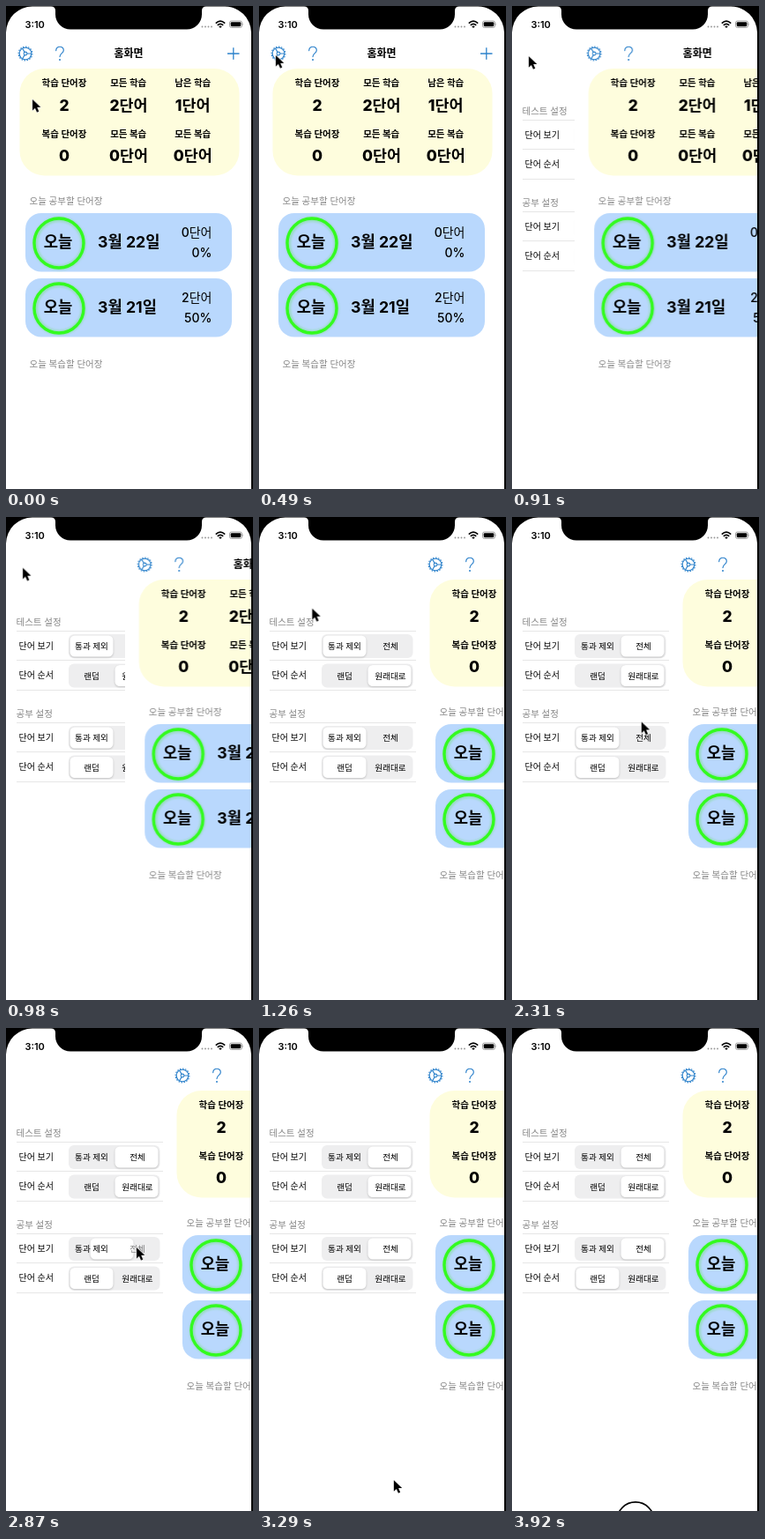
These frames come from a looping animation (280x548 px, 3.99 s). An HTML page:

```html
<!DOCTYPE html>
<html lang="ko">
<head>
<meta charset="utf-8">
<title>홈화면</title>
<style>
  html, body { margin: 0; width: 100%; height: 100%; overflow: hidden; background: #fff; }
  svg { display: block; width: 280px; height: 548px; }
  text { font-family: Inter, "Noto Sans CJK KR", "Noto Sans CJK", sans-serif; fill: #000; }
  .mid { text-anchor: middle; }
  .end { text-anchor: end; font-size: 14px; font-weight: 500; }
  .title { font-size: 12px; font-weight: 600; }
  .label { font-size: 10.5px; font-weight: 700; }
  .value { font-size: 17.4px; font-weight: 800; }
  .date { font-size: 17.7px; font-weight: 700; }
  .head { font-size: 10.5px; font-weight: 500; fill: #858585; }
  .row { font-size: 10px; font-weight: 500; }
  .seg { font-size: 9.6px; font-weight: 500; text-anchor: middle; }
  .rule { stroke: #e6e6e6; stroke-width: 1; }
  .blue { stroke: #2d82cb; fill: none; }
  .thumb { fill: #fff; filter: drop-shadow(0 1px 1.2px rgba(0,0,0,.2)); }
  .glow { filter: blur(.8px); }

  .anim { animation: 3990ms linear infinite; }
  #home { animation-name: slide; }
  #pick1 { animation-name: pick1; }
  #pick2 { animation-name: pick2; }
  #all1 { animation-name: dim1; }
  #all2 { animation-name: dim2; }
  #cursor { animation-name: point; }
  #tap { animation-name: tap; animation-timing-function: step-end; }

  @keyframes slide {
    0% { transform: none; }
    19.3% { transform: none; animation-timing-function: ease-in-out; }
    27.3%, 100% { transform: translateX(178px); }
  }
  @keyframes pick1 {
    0% { transform: none; }
    48.87% { transform: none; animation-timing-function: ease; }
    56.39%, 100% { transform: translateX(51px); }
  }
  @keyframes pick2 {
    0% { transform: none; }
    69.92% { transform: none; animation-timing-function: ease; }
    77.44%, 100% { transform: translateX(51px); }
  }
  @keyframes dim1 {
    0%, 45.3% { opacity: 1; }
    48.87% { opacity: .3; }
    56.39%, 100% { opacity: 1; }
  }
  @keyframes dim2 {
    0%, 66.4% { opacity: 1; }
    69.92% { opacity: .3; }
    77.44%, 100% { opacity: 1; }
  }
  @keyframes point {
    0% { transform: translate(30px, 105.7px); animation-timing-function: ease-in-out; }
    12.2%, 20% { transform: translate(19px, 55.7px); }
    24.5% { transform: translate(19px, 57.5px); animation-timing-function: ease-in; }
    31.58% { transform: translate(60px, 103.5px); animation-timing-function: ease-out; }
    44% { transform: translate(140px, 145.7px); }
    49.1% { transform: translate(140px, 145.7px); animation-timing-function: ease-in-out; }
    61.3% { transform: translate(148px, 248.7px); }
    71.9% { transform: translate(148px, 248.7px); animation-timing-function: ease-in; }
    78.95% { transform: translate(150px, 414px); animation-timing-function: ease-out; }
    85.8%, 100% { transform: translate(154px, 555px); }
  }
  @keyframes tap {
    0% { transform: translate(18px, 54px); opacity: 0; }
    13.8% { transform: translate(18px, 54px); opacity: 1; }
    17.3% { transform: translate(18px, 54px); opacity: 0; }
    45.3% { transform: translate(139px, 146px); opacity: 1; }
    48.87% { transform: translate(139px, 146px); opacity: 0; }
    66.4% { transform: translate(147px, 249px); opacity: 1; }
    69.92% { transform: translate(147px, 249px); opacity: 0; }
    98%, 100% { transform: translate(140px, 559px); opacity: 1; }
  }
</style>
</head>
<body>
<svg viewBox="0 0 280 548">
  <defs>
    <rect id="track" x="71" y="133" width="103.5" height="27" rx="6" fill="#eeeeef"/>
    <rect id="knob" x="72.5" y="134.5" width="49" height="24" rx="5.5"/>
    <path id="rules" class="rule" d="M12 129.5H178M12 162.5H178M12 196.5H178"/>
    <g id="card">
      <rect x="22" y="235" width="234" height="66.5" rx="18" fill="#b9d8fd"/>
      <g fill="none">
        <circle class="glow" cx="60.4" cy="269.4" r="27.3" stroke="#86dca0" stroke-width="6" opacity=".6"/>
        <circle cx="60" cy="269" r="28" stroke="#33fb1f" stroke-width="3.4"/>
      </g>
      <text class="date mid" x="59" y="274.2">오늘</text>
    </g>
  </defs>

  <rect width="280" height="548" fill="#fff"/>

  <g id="settings">
    <text class="head" x="11.5" y="123">테스트 설정</text>
    <text class="head" x="11.5" y="226.5">공부 설정</text>
    <use href="#rules"/>
    <use href="#rules" y="104"/>

    <text class="row" x="14.5" y="149.5">단어 보기</text>
    <use href="#track"/>
    <g id="pick1" class="anim"><use href="#knob" class="thumb"/></g>
    <text class="seg" x="97" y="150">통과 제외</text>
    <text id="all1" class="seg anim" x="149" y="150">전체</text>

    <text class="row" x="14.5" y="183">단어 순서</text>
    <use href="#track" y="33.5"/>
    <use href="#knob" class="thumb" x="51" y="33.5"/>
    <text class="seg" x="97" y="183.5">랜덤</text>
    <text class="seg" x="149" y="183.5">원래대로</text>

    <text class="row" x="14.5" y="253.5">단어 보기</text>
    <use href="#track" y="104"/>
    <g id="pick2" class="anim"><use href="#knob" class="thumb" y="104"/></g>
    <text class="seg" x="97" y="254">통과 제외</text>
    <text id="all2" class="seg anim" x="149" y="254">전체</text>

    <text class="row" x="14.5" y="287">단어 순서</text>
    <use href="#track" y="137.5"/>
    <use href="#knob" class="thumb" y="137.5"/>
    <text class="seg" x="97" y="287.5">랜덤</text>
    <text class="seg" x="149" y="287.5">원래대로</text>
  </g>

  <g id="home" class="anim">
    <rect width="280" height="548" fill="#fff"/>
    <g class="blue" transform="translate(22 54) scale(.94)">
      <circle r="7.2" stroke-width="1.2"/>
      <circle r="8.3" stroke-width="1.3" pathLength="32" stroke-dasharray="1"/>
      <circle r="2" stroke-width="1.1"/>
      <path d="M2 0H7M-1 -1.7L-3.5 -6.1M-1 1.7L-3.5 6.1" stroke-width="1.2"/>
    </g>
    <path class="blue" d="M56.7 50.6C56.9 44.8 65.4 44.9 65.3 50.3C65.2 53.8 61 53.6 61 57.6" stroke-width="1.2" stroke-linecap="round"/>
    <circle cx="61" cy="60.9" r="1" fill="#2d82cb"/>
    <path class="blue" d="M251 54H264.5M257.8 47.3V60.7" stroke-width="1.3"/>
    <text class="title mid" x="139" y="58">홈화면</text>

    <rect x="15.5" y="71" width="249" height="121.5" rx="28" fill="#fefddd"/>
    <g class="mid">
      <text class="label" x="66" y="91">학습 단어장</text>
      <text class="label" x="138.7" y="91">모든 학습</text>
      <text class="label" x="211.7" y="91">남은 학습</text>
      <text class="value" x="66" y="119.2">2</text>
      <text class="value" x="139" y="119.2">2단어</text>
      <text class="value" x="211.7" y="119.2">1단어</text>
      <text class="label" x="66" y="148.5">복습 단어장</text>
      <text class="label" x="138.7" y="148.5">모든 복습</text>
      <text class="label" x="211.7" y="148.5">모든 복습</text>
      <text class="value" x="66" y="176.2">0</text>
      <text class="value" x="139" y="176.2">0단어</text>
      <text class="value" x="211.7" y="176.2">0단어</text>
    </g>

    <text class="head" x="26.5" y="224.5">오늘 공부할 단어장</text>
    <use href="#card"/>
    <text class="date" x="104" y="274.2">3월 22일</text>
    <text class="end" x="233.5" y="261.8">0단어</text>
    <text class="end" x="233.5" y="285">0%</text>
    <use href="#card" y="74"/>
    <text class="date" x="104" y="348.2">3월 21일</text>
    <text class="end" x="233.5" y="335.8">2단어</text>
    <text class="end" x="233.5" y="359">50%</text>
    <text class="head" x="26.5" y="410">오늘 복습할 단어장</text>
  </g>

  <g id="status">
    <text x="21.4" y="24.7" font-size="11" font-weight="600">3:10</text>
    <path d="M222.5 23.5H234" stroke="#999" stroke-width="1.9" stroke-linecap="round" stroke-dasharray="0 3.5"/>
    <path d="M237.8 19.6Q243 14.8 248.2 19.6M239.8 21.8Q243 18.8 246.2 21.8" fill="none" stroke="#000" stroke-width="1.7"/>
    <path d="M241.2 23.2Q243 21.6 244.8 23.2L243 25Z"/>
    <rect x="253.5" y="17" width="14" height="7.4" rx="2" fill="none" stroke="#888" stroke-width=".8"/>
    <rect x="254.7" y="18.2" width="11.6" height="5" rx="1.1"/>
    <path d="M268.6 19.4Q270 20.7 268.6 22Z" fill="#888"/>
  </g>

  <!-- Phone bezel with notch -->
  <path fill-rule="evenodd" d="M0 0H280V548H278V30A30 30 0 0 0 248 .5H227Q222 .5 222 5.5V9.5A17 17 0 0 1 205 26.5H73A17 17 0 0 1 56 9.5V5.5Q56 .5 51 .5H30A30 30 0 0 0 0 30Z"/>

  <g id="tap" class="anim"><circle r="21.1" fill="none" stroke="#000" stroke-width="1.6"/></g>
  <g id="cursor" class="anim">
    <path transform="scale(.88)" d="M0 0V14.6L3.4 11.5L5.8 17L8.3 15.9L6 10.5H10.6Z" stroke="#fff" stroke-width="1.4" stroke-linejoin="round" paint-order="stroke"/>
  </g>
</svg>
</body>
</html>
```
